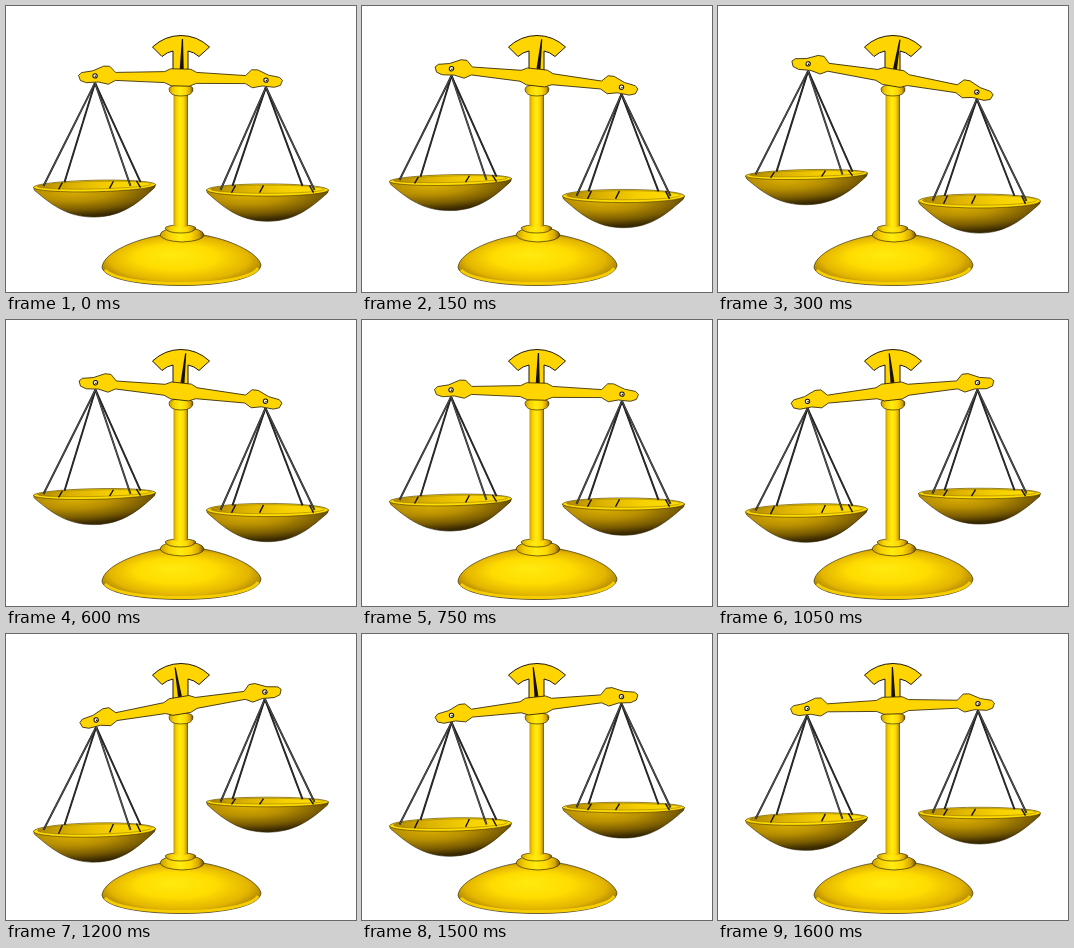
An HTML page for the animation above (1700 ms loop, 350 by 286 pixels).

```html
<!DOCTYPE html>
<html>
<head>
<meta charset="utf-8">
<style>
  html, body { margin: 0; width: 100%; height: 100%; overflow: hidden; background: #fff; }
  svg { display: block; width: 350px; height: 286px; }
</style>
</head>
<body>
<svg viewBox="0 0 350 286" stroke-linejoin="round">
  <defs>
    <linearGradient id="column">
      <stop offset="0" stop-color="#c79c00"/>
      <stop offset=".2" stop-color="#f6d000"/>
      <stop offset=".45" stop-color="#ffec10"/>
      <stop offset=".7" stop-color="#fdd800"/>
      <stop offset=".88" stop-color="#d5a500"/>
      <stop offset="1" stop-color="#6e5000"/>
    </linearGradient>
    <radialGradient id="dome" cx=".5" cy=".5" r=".56" fx=".44" fy=".38">
      <stop offset="0" stop-color="#ffea10"/>
      <stop offset=".45" stop-color="#ffdc00"/>
      <stop offset=".78" stop-color="#e3b500"/>
      <stop offset="1" stop-color="#9a7500"/>
    </radialGradient>
    <radialGradient id="bowl" cx=".34" cy=".15" r=".8">
      <stop offset="0" stop-color="#dcb000"/>
      <stop offset=".4" stop-color="#b88f00"/>
      <stop offset=".75" stop-color="#7a5c00"/>
      <stop offset="1" stop-color="#3a2a00"/>
    </radialGradient>
    <linearGradient id="inside">
      <stop offset="0" stop-color="#b08800"/>
      <stop offset=".3" stop-color="#dcb200"/>
      <stop offset=".65" stop-color="#f6d000"/>
      <stop offset="1" stop-color="#ffe000"/>
    </linearGradient>
  </defs>

  <g stroke="#201800" stroke-width=".6">
    <path fill="url(#dome)" d="M156 229C130 233 98 246 96 261C97 273 134 279.500 176 279.500S254 272 255 259C252 246 222 233 197 229Z"/>
    <path fill="none" stroke="#f6ce00" stroke-width="3" d="M99 264C108 273 138 277.500 176 277.500S246 272 252 262"/>
    <path fill="url(#column)" d="M154 229Q155 222 176 222Q197 222 198 229Q197 235 176 236Q156 235 154 229Z"/>
    <path fill="url(#column)" d="M159 222Q161 219 175 219Q188 219 190 222Q188 227 175 227Q161 227 159 222Z"/>
    <path fill="url(#column)" stroke="none" d="M167.500 87H182V220Q175 223 167.500 220Z"/>
    <path fill="#ffd500" stroke-width="1" d="M146.500 41Q159 29.500 175 29.500Q191 29.500 203.500 41L193 50.500Q188 46 182 45V67H167V45Q161 46 156 50.500Z"/>
    <path fill="url(#column)" d="M163 83Q163 79 175 79Q187 79 187 83Q187 90 175 90Q163 90 163 83Z"/>
  </g>
  <path id="needle" fill="#181200" d="M-.6 -39H.6L2 -9H-2Z"/>
  <g id="pans"></g>
  <g id="beam">
    <path id="bar" fill="#ffd500" stroke="#2a2000" stroke-width=".8"/>
    <g id="holes"></g>
  </g>
</svg>
<script>
const LOOP = 1700;
// start ms, beam angle, left rim y, right rim y
const poses = [
  [0, 1.4, 180, 184],
  [150, 6.2, 174, 190],
  [300, 9.5, 168.5, 195],
  [600, 6.2, 174, 190],
  [750, 1.4, 180, 184],
  [900, -1.6, 185, 179],
  [1050, -6.3, 190.5, 173.5],
  [1200, -9.4, 196, 168],
  [1500, -6.3, 190.5, 173.5],
  [1600, -1.6, 185, 179]
];
const center = { x: 174.5, y: 72 };
const ARM = 85.5;
// right half of the beam, from the top middle round to the bottom middle
const beamHalf = [
  [10, -9], [16, -6], [65, -4], [71, -10], [77, -10], [88, -5], [99, -3],
  [102, 0], [100, 5], [94, 7], [82, 6], [72, 8], [65, 4], [16, 5], [9, 8]
];

const byId = id => document.getElementById(id);
function set(el, attrs) {
  for (const key in attrs) el.setAttribute(key, attrs[key]);
}
function add(parent, tag, attrs = {}) {
  const el = document.createElementNS("http://www.w3.org/2000/svg", tag);
  set(el, attrs);
  parent.append(el);
  return el;
}

const mirrored = beamHalf.map(([x, y]) => [-x, y]).reverse();
set(byId("bar"), { d: "M" + [...beamHalf, ...mirrored].join("L") + "Z" });

function makePan(side, x, markX, tilt, ends) {
  const group = add(byId("pans"), "g");
  const bowl = add(group, "path", { fill: "url(#bowl)", stroke: "#2a2000", "stroke-width": .6 });
  const rim = add(group, "ellipse", { fill: "#ffdc00", stroke: "#4a3800", "stroke-width": .6 });
  const hollow = add(group, "ellipse", { fill: "url(#inside)", stroke: "#8a6a00", "stroke-width": .5 });
  const marks = add(group, "path", { stroke: "#181200", "stroke-width": 1.4, fill: "none" });
  const strings = ends.map(end => ({
    ...end,
    dark: add(byId("pans"), "path", { stroke: "#141414", "stroke-width": 1.9 }),
    light: add(byId("pans"), "path", { stroke: end.front ? "#888" : "#444", "stroke-width": .6 })
  }));
  const holeX = side * ARM;
  add(byId("holes"), "circle", { cx: holeX, cy: 0, r: 2.2, fill: "#fff", stroke: "#181200" });
  add(byId("holes"), "circle", { cx: holeX + .5, cy: .4, r: .8, fill: "#181200" });

  return (angle, y) => {
    const ry = 5.8 + (y - 180) * .08;
    const depth = 31 + (y - 180) * .07;
    const knot = {
      x: center.x + holeX * Math.cos(angle),
      y: center.y + holeX * Math.sin(angle) + 7
    };
    group.setAttribute("transform", `translate(${x} ${y}) rotate(${tilt})`);
    set(bowl, { d: `M-61 0L-60 3C-44 17 -28 ${depth} 0 ${depth}S44 17 60 3L61 0Z` });
    set(rim, { rx: 61, ry });
    set(hollow, { cy: -.8, rx: 57, ry: ry - 2 });
    const line = (at, lean) => `M${at} ${1.5 - ry}l${lean} ${ry * 1.2}`;
    set(marks, { d: line(markX, -4) + line(-32, -4) + line(42, 4) });
    for (const { dx, front, dark, light } of strings) {
      const d = `M${knot.x} ${knot.y}L${x + dx} ${y + (front ? 0 : 2 - ry)}`;
      set(dark, { d });
      set(light, { d });
    }
  };
}

const string = (dx, front) => ({ dx, front });
const drawLeft = makePan(-1, 88.5, 19, -1.3,
  [string(-30), string(46), string(-51, true), string(36, true)]);
const drawRight = makePan(1, 261.5, -4, 0,
  [string(-35), string(35), string(-47, true), string(47, true)]);

let current;
function frame() {
  const time = performance.now() % LOOP;
  const pose = poses.findLast(([start]) => start <= time);
  if (pose !== current) {
    current = pose;
    const [, degrees, leftY, rightY] = pose;
    const angle = degrees * Math.PI / 180;
    drawLeft(angle, leftY);
    drawRight(angle, rightY);
    set(byId("beam"), { transform: `translate(${center.x} ${center.y}) rotate(${degrees})` });
    set(byId("needle"), { transform: `translate(175.5 72) rotate(${degrees})` });
  }
  requestAnimationFrame(frame);
}
frame();
</script>
</body>
</html>
```
